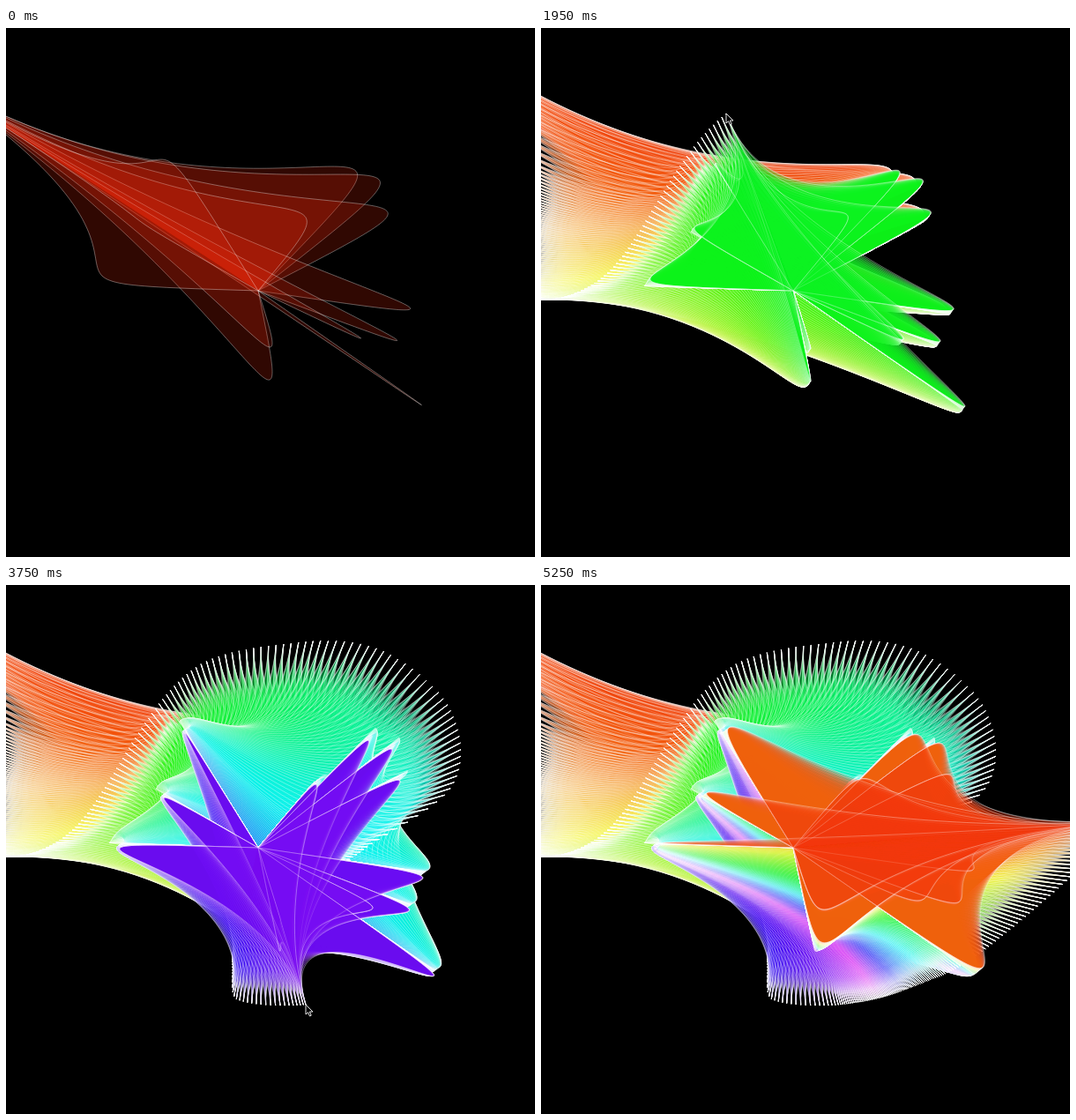
An HTML page with a canvas for the animation above (5.3 s loop, 600 by 600 pixels).

```html
<!DOCTYPE html>
<html lang="en">
<head>
<meta charset="utf-8">
<title>Ribbon trail</title>
<style>
  html, body { margin: 0; width: 100%; height: 100%; overflow: hidden; background: #000; }
  canvas, svg { position: absolute; left: 0; top: 0; width: 600px; height: 600px; }
</style>
</head>
<body>
<canvas id="stage" width="600" height="600"></canvas>
<svg viewBox="0 0 600 600">
  <path id="cursor" d="M0 0V11L2.6 8.7 4.5 13 6.2 12.2 4.4 8H8Z" fill="#000" stroke="#fff" stroke-width=".9"/>
</svg>
<script>
const LOOP = 5300, FRAME = 50, STEP = 12.5;
const HUE_TURN = 4030, HUE_MIN = 8, HUE_MAX = 293;
const CX = 286, CY = 298;
const ctx = document.getElementById('stage').getContext('2d');
const cursor = document.getElementById('cursor');

// Handle of each petal, relative to the centre
const petals = [
  [279, -287], [338, -265], [358, -185], [416, 61], [382, 143], [288, 137], [445, 310],
  [50, 245], [50, 160], [146, -174], [-190, -306], [-358, -11], [-245, -140]
];

// Turning points of the pointer: time, x, y
const path = [
  [0, -115, 38], [200, -95, 20], [350, -28, 150], [700, -22, 236], [1150, -15, 306],
  [1500, 75, 278], [1950, 210, 97], [2170, 345, 64], [2290, 430, 76], [2420, 503, 140],
  [2570, 506, 228], [2700, 410, 297], [3300, 264, 405], [3460, 257, 440], [3540, 262, 470],
  [3750, 340, 476], [4450, 436, 450], [4800, 508, 410], [LOOP, 694, 250]
];

// Smooth curve through the turning points
function pointer(t) {
  const end = path.length - 1;
  let i = 0;
  while (i < end - 1 && t >= path[i + 1][0]) i++;
  const a = path[i], b = path[i + 1];
  const before = path[Math.max(0, i - 1)], after = path[Math.min(end, i + 2)];
  const span = b[0] - a[0], u = (t - a[0]) / span;
  return [1, 2].map(k => {
    const inSlope = (b[k] - before[k]) / (b[0] - before[0]) * span;
    const outSlope = (after[k] - a[k]) / (after[0] - a[0]) * span;
    const d = b[k] - a[k];
    return a[k] + u * (inSlope + u * (3 * d - 2 * inSlope - outSlope + u * (inSlope + outSlope - 2 * d)));
  });
}

// Slow climb from red to pink, then a quick steady return
function hueAt(t) {
  return t < HUE_TURN
    ? HUE_MIN + (HUE_MAX - HUE_MIN) * (t / HUE_TURN) ** 1.2
    : HUE_MAX * (LOOP - t) / (LOOP - HUE_TURN);
}

function drawStep(t) {
  const [x, y] = pointer(t);
  ctx.fillStyle = `hsla(${hueAt(t)}, 92%, 49%, .2)`;
  for (const [px, py] of petals) {
    ctx.beginPath();
    ctx.moveTo(CX, CY);
    ctx.bezierCurveTo(CX + px, CY + py, CX, CY, x, y);
    ctx.fill();
    ctx.stroke();
  }
}

let next = 0;

function render(time) {
  const t = Math.floor(time % LOOP / FRAME) * FRAME;
  const last = t / STEP;
  if (last < next - 1) next = 0;
  if (next === 0) ctx.clearRect(0, 0, 600, 600);
  while (next <= last) drawStep(next++ * STEP);
  const [x, y] = pointer(t);
  cursor.setAttribute('transform', `translate(${x.toFixed(1)} ${y.toFixed(1)})`);
}

ctx.lineWidth = 1;
ctx.strokeStyle = 'rgba(255, 255, 255, .35)';

const start = performance.now();
function tick() {
  render(performance.now() - start);
  requestAnimationFrame(tick);
}
tick();
</script>
</body>
</html>
```
